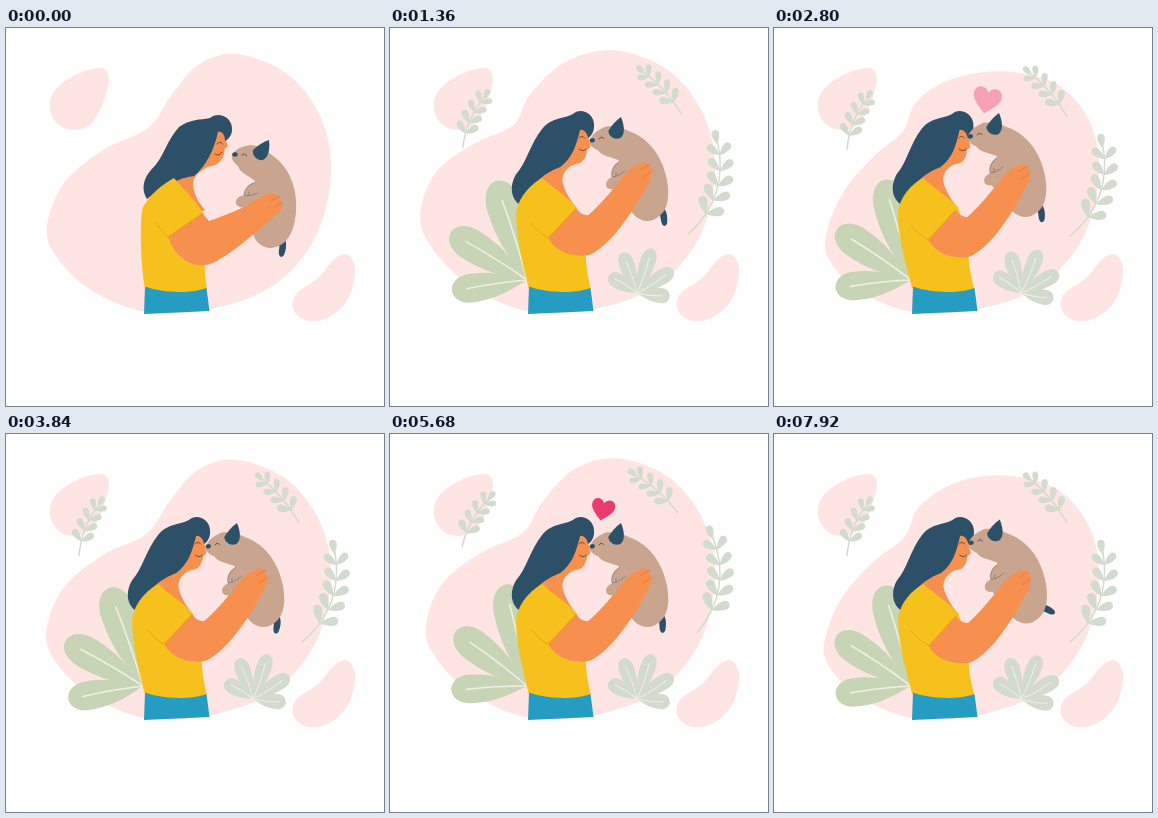
Recreate the animation shown at these times as an HTML page. Size 378 by 378 pixels, loop 8000 ms.

```html
<!DOCTYPE html>
<html lang="en">
<head>
<meta charset="utf-8">
<title>Woman and puppy</title>
<style>
html, body { margin: 0; width: 100%; height: 100%; overflow: hidden; background: #fff; }
svg { display: block; width: 100vw; height: 100vh; }
.pink { fill: #fee4e3; }
.skin { fill: #f78f4e; }
.hair { fill: #2d5069; }
.fur { fill: #c9a58f; }
.sage { fill: #d3dbce; }
.olive { fill: #c8d4b6; }
.line { fill: none; stroke: #3b4654; stroke-width: .8; stroke-linecap: round; }
.soft { stroke: #7d6a66; stroke-width: .6; }
</style>
</head>
<body>
<svg viewBox="0 0 378 378">
  <path id="blob" class="pink"/>
  <path class="pink" d="M93 40C103 40 105 48 101 62C97 76 93 86 86 95C77 104 60 104 52 96C42 87 41 71 50 61C60 50 76 42 93 40Z"/>
  <path class="pink" d="M338 226C345 226 350 234 349 246C348 262 340 279 328 286C315 296 301 295 292 288C284 281 285 270 292 264C300 257 308 255 315 247C322 239 328 228 338 226Z"/>
  <g id="plants"></g>
  <g id="upper">
    <path id="face" class="skin"/>
    <path id="hair" class="hair"/>
    <path id="eye" class="line"/>
    <path id="smile" class="line"/>
    <path id="shirt" fill="#f6c01d"/>
  </g>
  <path fill="#279cc2" d="M139 258.500C158 265.500 185 265.500 200.500 260L203.500 283L138 286Z"/>
  <g class="dog">
    <path id="tail" class="hair" d="M271 207C279 206 283 215 278 227C275 231 272 228 273 222C274 217 273 213 271 207Z"/>
    <path class="fur" d="M226 127C230 120 238 118 245 117C253 118 260 122 267 128C283 139 292 160 290 184C288 206 280 219 264 220C252 219 245 208 246 196C238 190 235 180 236 170C240 164 246 158 249 153C242 147 234 145 232 138C228 135 225 131 226 127Z"/>
    <path class="hair" d="M247 122C251 118 257 114 263 112C264 120 263 129 257 132C251 133 246 128 247 122Z"/>
    <ellipse class="hair" cx="229" cy="126.500" rx="2.700" ry="2.200"/>
    <path class="line" d="M236 127Q239 124.500 240.500 128"/>
    <path class="fur" d="M230 176C229 170 234 167 242 167L247 178C240 181 232 180 230 176Z"/>
  </g>
  <g id="armBox">
    <path id="arm" class="skin"/>
    <path id="fingers" fill="none" stroke="#dc783e" stroke-width=".8" stroke-linecap="round"/>
    <path id="seam" fill="none" stroke="#d9a21a" stroke-width=".8"/>
  </g>
  <g class="dog">
    <path class="fur" d="M238 167C239 158 246 153 253 155C261 158 258 165 250 167Z"/>
    <path class="line soft" d="M248 155C242 157 238 162 238 167C243 169 248 166 252 165M242 167L243 164"/>
  </g>
  <path id="heart" fill="#e83b6e" d="M0 12C-5 7 -13 2 -11.500 -5C-10 -11 -2.500 -11 0 -5.500C2.500 -11 10 -11 11.500 -5C13 2 5 7 0 12Z"/>
</svg>
<script>
const LOOP = 8000, CYCLE = 4980;
const $ = id => document.getElementById(id);
const put = (id, d) => $(id).setAttribute('d', d);
const move = (el, s) => el.setAttribute('transform', s);

// Eased 0..1 between two times, and a bell around one
const ramp = (t, a, b) => (1 - Math.cos(Math.PI * Math.min(1, Math.max(0, (t - a) / (b - a))))) / 2;
const bell = (t, c, w) => Math.exp(-(((t - c) / w) ** 2));

// Closed Catmull-Rom curve
function loopPath(p) {
  const n = p.length, at = i => p[(i + n) % n];
  let d = 'M' + p[0];
  for (let i = 0; i < n; i++) {
    const [a, b, c, e] = [at(i - 1), at(i), at(i + 1), at(i + 2)];
    const c1 = b.map((v, k) => v + (c[k] - a[k]) / 6);
    const c2 = c.map((v, k) => v - (e[k] - b[k]) / 6);
    d += `C${c1} ${c2} ${c}`;
  }
  return d + 'Z';
}

// Blend two path strings that share their commands
function blend(a, b, u) {
  const nums = b.match(/-?[\d.]+/g);
  let i = 0;
  return a.replace(/-?[\d.]+/g, v => (+v + (nums[i++] - v) * u).toFixed(2));
}

// Resting outline, clockwise from the top
const outline = [[230,26],[280,45],[314,88],[325,143],[310,208],[268,257],[205,281],[140,284],
                 [85,262],[50,228],[41,198],[58,155],[97,122],[142,100],[165,68],[192,37]];

// The notch fills up, the left lobe swells or shrinks, the top sinks
function blobPath(rest, low) {
  const wide = 1 - rest - low, n = outline.length;
  return loopPath(outline.map(([x, y], i) => {
    const near = (c, w) => bell((i - c + n * 1.5) % n, n / 2, w);
    const lobe = (low - wide) * near(10.6, 2);
    return [x - 24 * (1 - rest) * near(14, 1.6) + 12 * lobe,
            y + 11 * lobe + (18 * low - 4 * wide) * near(15.7, 1.6)];
  }));
}

// Upright and leaning pose of each part
const body = {
  face: ['M207 104L219 104C219 110 220 113 221.5 117C222 120 219 120 218.500 121C219 128 214 137 205 138C199 139 189 146 187 154C187 162 190 172 199 182L190 186C175 178 165 165 160 152L200 120Z',
         'M187 100L199 100C198 108 200 111 201 117C202 120 199 121 198 122C197 130 193 136 186 136C180 138 174 143 173 151C173 158 178 168 187 180L172 184C160 175 150 160 146 152L180 120Z'],
  hair: ['M204 90C212 83 227 89 226 102C226 107 222 112 219 113C219 107 216 103 212 104C208 122 200 138 188 148C172 150 158 158 141 171C135 162 137 151 145 142C158 130 160 113 173 99C184 91 194 92 204 90Z',
         'M184 86C191 79 206 85 205 98C205 104 202 108 199 110C198 105 195 101 191 102C187 118 183 130 171 139C155 145 143 155 131 177C121 171 120 157 127 146C137 135 141 116 153 101C163 89 175 91 184 86Z'],
  eye: ['M211 116Q214 112 216.500 116', 'M190 110Q193 106.500 195.500 110'],
  smile: ['M209 126Q213 129 216 124', 'M190 121Q194 124.500 197 121'],
  shirt: ['M168 150C155 157 143 168 137 179C133 195 135 240 139 260C158 266 185 266 201 261C199 250 198 235 199 215C200 205 200 195 197 185C190 172 179 163 168 150Z',
          'M153 150C140 157 131 168 127 182C125 205 134 240 139 260C158 266 185 266 201 261C198 248 196 238 196 222C194 205 192 195 187 179C178 169 165 161 153 150Z'],
  arm: ['M162 209C168 225 180 239 200 237C215 235 250 205 275 182C278 176 274 167 266 165C258 166 250 172 240 178C225 185 212 190 203 193C200 190 198 187 197 185Z',
        'M159 210C166 222 180 229 198 227C212 224 235 200 259 156C264 149 264 136 257 134C250 136 243 138 238 144C225 160 210 178 199 187C192 187 190 183 187 180Z'],
  fingers: ['M274 168L265 173M276 174L268 179', 'M261 136L252 141M263 143L254 149'],
  seam: ['M149 193Q154 202 162 209L197 185', 'M142 195Q149 204 159 210L187 180']
};

// Foliage
const leaf = (x, y, deg, len, w, cls) =>
  `<path class="${cls}" transform="translate(${x} ${y}) rotate(${deg})" d="M0 0C${len * .3} ${-w * .7} ${len * .5} ${-w} ${len * .78} ${-w * .95}C${len * 1.07} ${-w * .8} ${len * 1.07} ${w * .8} ${len * .78} ${w * .95}C${len * .5} ${w} ${len * .3} ${w * .7} 0 0Z"/>`;
const rib = (deg, len, w) =>
  `<path transform="rotate(${deg})" d="M0 0Q${len * .4} 2 ${len * .8} 0" fill="none" stroke="#eff1df" stroke-width="${w}" stroke-linecap="round"/>`;

function fan(count, from, step, size, cls, ribWidth) {
  let s = '';
  for (let i = 0; i < count; i++) {
    const deg = from + step * i, [len, w] = size(i);
    s += leaf(0, 0, deg, len, w, cls) + rib(deg, len, ribWidth);
  }
  return s;
}

function sprig(len, bend, pairs, size) {
  let s = `<path d="M0 0Q${bend} ${-len / 2} 0 ${-len}" fill="none" stroke="#d3dbce" stroke-width="1.500"/>`;
  for (let i = 0; i < pairs; i++) {
    const u = .26 + .62 * i / (pairs - 1);
    const x = 2 * u * (1 - u) * bend, y = -len * u;
    const dir = Math.atan2(-len, 2 * (1 - 2 * u) * bend) * 180 / Math.PI;
    const k = size * (1.1 - .25 * u);
    for (const side of [-46, 46]) s += leaf(x, y, dir + side, k, k * .25, 'sage');
  }
  return s + leaf(0, 2 - len, -90 - bend, size * .8, size * .22, 'sage');
}

// Each plant: base, tilt, then shift and turn in the wind
const plants = [
  { at: [137,252], tilt: 0, wind: [0,0,3], loose: 1, art: fan(3, 174, 40.5, i => [76 + 14 * i, 15 + 1.5 * i], 'olive', 1.6) },
  { at: [247,265], tilt: 5, wind: [0,0,-4], loose: 1, art: fan(5, 211, 38.5, i => [33 + 14 * Math.sin(Math.PI * i / 4), 8], 'sage', 1) },
  { at: [295,209], tilt: 20.5, wind: [12,-10,-11], loose: 0, art: sprig(97, 28, 5, 18) },
  { at: [293,89], tilt: -40, wind: [-5,-10,-8], loose: 0, art: sprig(57, 6, 4, 14) },
  { at: [73,122], tilt: 21, wind: [-1,-9,8], loose: 0, art: sprig(55, -8, 4, 14) }
];
$('plants').innerHTML = plants.map(p => `<g>${p.art}</g>`).join('');
const plantEls = [...$('plants').children];
const dogs = [...document.querySelectorAll('.dog')];

function drawHeart(t) {
  const u = (t - (t < 4000 ? 1900 : 5200)) / 1150, fade = ramp(u, .5, 1);
  move($('heart'), `translate(213 ${79 - 10 * u}) rotate(12) scale(${ramp(u, 0, .3) + .35 * fade})`);
  $('heart').setAttribute('opacity', u < 0 ? 0 : 1 - fade);
}

function draw(t) {
  const p = t % CYCLE;
  const sink = ramp(p, 2750, 3600);
  const low = ramp(p, 1300, 2750) * (1 - sink);
  const rest = 1 - ramp(t, 0, 1300) + sink * (1 - ramp(p, 3600, 5000)) + .65 * bell(t, 5800, 250);
  put('blob', blobPath(rest, low));

  const grow = ramp(t, 100, 850), wind = bell(p, 700, 550);
  const droop = -4 * (1 - low) * (1 - wind);
  plants.forEach(({ at, tilt, wind: [dx, dy, turn], loose }, i) => move(plantEls[i],
    `translate(${at[0] + dx * wind} ${at[1] + dy * wind}) rotate(${tilt + turn * wind + loose * droop}) scale(${grow})`));

  const lean = ramp(t, 0, 1150), skew = lean * (.005 + .025 * low);
  for (const id in body) put(id, blend(...body[id], lean));
  const bow = `matrix(1 0 ${skew} 1 ${-285 * skew} 0)`;
  move($('upper'), bow);
  move($('armBox'), bow + `translate(${-90 * skew} ${70 * skew})`);

  const turn = -16 * lean;
  dogs.forEach(d => move(d, `translate(${-16 * lean - 6 * low} ${-25 * lean - 4 * low}) rotate(${turn} 262 170)`));
  const wag = 42 + 38 * Math.cos(2 * Math.PI * t / 478);
  move($('tail'), `rotate(${wag - 80 - turn} 272 209)`);

  drawHeart(t);
}

function tick() {
  draw(performance.now() % LOOP);
  requestAnimationFrame(tick);
}
tick();
</script>
</body>
</html>
```
